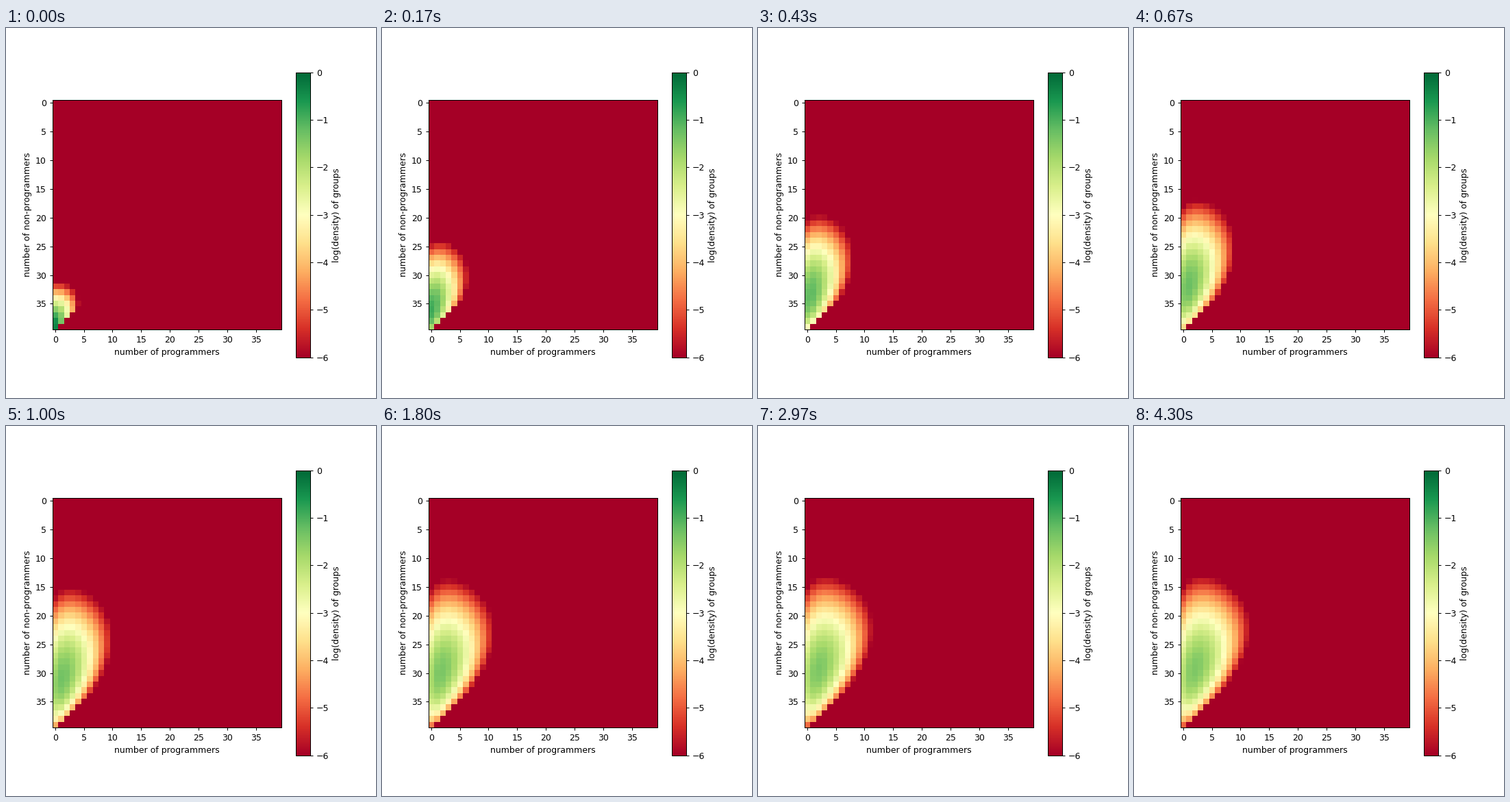
A matplotlib script that plays this animation: 540x540 px, repeating every 8000 ms.

```python
import numpy as np
import matplotlib.pyplot as plt
from matplotlib.animation import FuncAnimation

SIZE = 40            # states 0..39 on each axis
CAP = SIZE - 1       # largest group
FRAMES, FPS = 240, 30
SUBSTEPS = 4

# rates per displayed frame
JOIN = 0.104         # logistic recruitment of non-programmers
LEAVE_N = 0.02
LEAVE_P = 0.03
LEARN = 0.0026       # non-programmer becomes programmer

n, p = np.mgrid[0:SIZE, 0:SIZE]
total = n + p
join_rate = JOIN * total * np.clip(1 - total / CAP, 0, None)


def flow(g):
    """Master equation for the density of groups with n, p members."""
    join = join_rate * g
    leave_n = LEAVE_N * n * g
    leave_p = LEAVE_P * p * g
    learn = LEARN * n * g
    d = -(join + leave_n + leave_p + learn)
    d[1:] += join[:-1]
    d[:-1] += leave_n[1:]
    d[:, :-1] += leave_p[:, 1:]
    d[:-1, 1:] += learn[1:, :-1]
    return d


def advance(g):
    h = 1 / SUBSTEPS
    for _ in range(SUBSTEPS):
        k1 = flow(g)
        k2 = flow(g + h / 2 * k1)
        k3 = flow(g + h / 2 * k2)
        k4 = flow(g + h * k3)
        g = g + h / 6 * (k1 + 2 * k2 + 2 * k3 + k4)
    return g


def solve():
    g = np.zeros((SIZE, SIZE))
    g[CAP, 0] = 1
    states = []
    for _ in range(FRAMES):
        g = advance(g)
        states.append(np.log10(np.maximum(g, 1e-12)))
    return states


states = solve()

fig = plt.figure(figsize=(6, 6), dpi=90)
ax = fig.add_subplot()
image = ax.imshow(states[0], cmap="RdYlGn", vmin=-6, vmax=0)
ax.set_xlabel("number of programmers")
ax.set_ylabel("number of non-programmers")
fig.colorbar(image, ax=ax, label="log(density) of groups")


def draw(i):
    image.set_data(states[i])
    return (image,)


anim = FuncAnimation(fig, draw, frames=FRAMES, interval=1000 / FPS,
                     repeat=True, repeat_delay=0)
plt.show()
```
